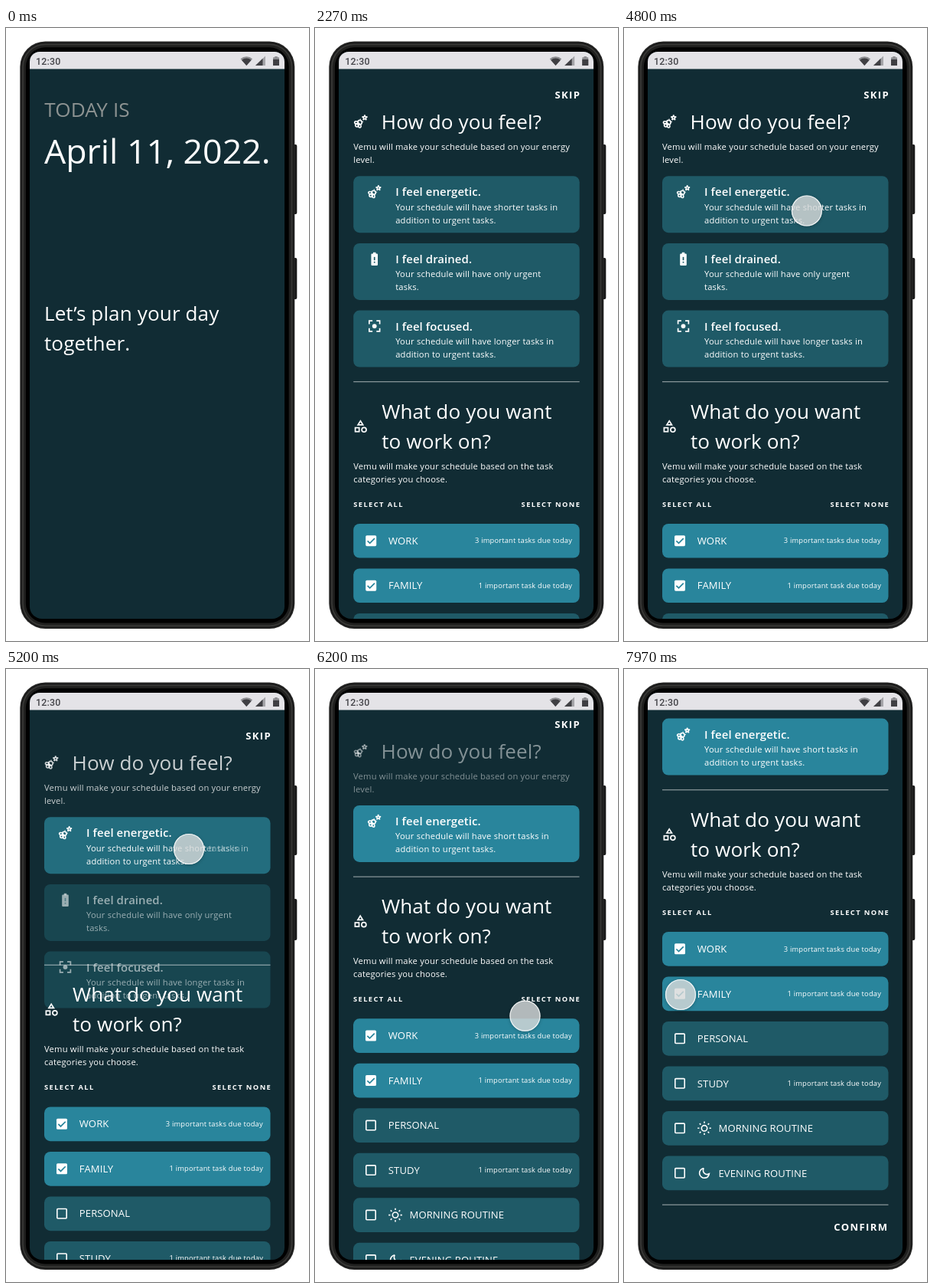
These frames come from a looping animation (396x800 px, 8 s). An HTML page with a canvas:

```html
<!DOCTYPE html>
<html lang="en">
<head>
<meta charset="utf-8">
<title>Day planner</title>
<style>
html, body { margin: 0; width: 100%; height: 100%; overflow: hidden; background: #fff; }
canvas { display: block; width: 396px; height: 800px; }
</style>
</head>
<body>
<canvas id="stage"></canvas>
<script>
const LOOP = 8000, W = 396, H = 800;
const SANS = '"Open Sans", "Noto Sans", sans-serif';
const BG = '#112c34', IDLE = [31, 90, 103], ACTIVE = [41, 133, 156];
const FOLD = 175.3, SCROLL = 128.6, PAGE = 333;

const canvas = document.getElementById('stage');
const ctx = canvas.getContext('2d');
const ratio = window.devicePixelRatio || 1;
canvas.width = W * ratio;
canvas.height = H * ratio;

// ---------- timing ----------
const clamp = v => Math.max(0, Math.min(1, v));
const mix = (a, b, p) => a + (b - a) * p;
const span = (t, start, length) => clamp((t - start) / length);
const inOut = x => x < 0.5 ? 2 * x * x : 1 - 2 * (1 - x) * (1 - x);

// cubic-bezier(0, 0, .58, 1)
function easeOut(x) {
  if (x <= 0 || x >= 1) return x;
  let lo = 0, hi = 1;
  for (let i = 0; i < 20; i++) {
    const s = (lo + hi) / 2;
    if (3 * (1 - s) * s * s * 0.58 + s * s * s < x) lo = s; else hi = s;
  }
  return lo * lo * (3 - 2 * lo);
}

// ---------- drawing helpers ----------
const tone = p => `rgb(${IDLE.map((v, i) => Math.round(mix(v, ACTIVE[i], p)))})`;

function rounded(x, y, w, h, r, fill) {
  ctx.beginPath();
  ctx.roundRect(x, y, w, h, r);
  if (fill) { ctx.fillStyle = fill; ctx.fill(); }
}

function text(str, x, y, size, { weight = 400, gap = 0, color = '#fff', family = SANS } = {}) {
  ctx.font = `${weight} ${size}px ${family}`;
  ctx.letterSpacing = gap + 'px';
  ctx.fillStyle = color;
  ctx.fillText(str, x, y);
  return ctx.measureText(str).width;
}

const title = (s, x, y, color) => text(s, x, y, 26.1, { color, gap: 0.09 });
const body = (s, x, y) => text(s, x, y, 11.2, { gap: 0.18 });
const button = (s, x, y) => text(s, x, y, 13.07, { weight: 700, gap: 1.4 });
const link = (s, x, y) => text(s, x, y, 9.33, { weight: 700, gap: 1.4 });

function faded(alpha, draw) {
  if (alpha <= 0) return;
  ctx.save();
  ctx.globalAlpha *= alpha;
  draw();
  ctx.restore();
}

function line(...pts) {
  ctx.beginPath();
  for (let i = 0; i < pts.length; i += 2) ctx.lineTo(pts[i], pts[i + 1]);
}

function ring(x, y, rx, ry = rx, turn = 0) {
  ctx.beginPath();
  ctx.ellipse(x, y, rx, ry, turn, 0, 7);
  ctx.stroke();
}

function dot(x, y, r) {
  ctx.beginPath();
  ctx.arc(x, y, r, 0, 7);
  ctx.fill();
}

function divider(y) {
  ctx.fillStyle = 'rgba(255,255,255,.62)';
  ctx.fillRect(50, y, 295.5, 1);
}

// ---------- icons, on a 24 unit grid ----------
function icon(draw, x, y, scale) {
  ctx.save();
  ctx.translate(x - 12 * scale, y - 12 * scale);
  ctx.scale(scale, scale);
  ctx.fillStyle = ctx.strokeStyle = '#fff';
  ctx.lineWidth = 2;
  draw();
  ctx.restore();
}

function bee() {
  ctx.lineWidth = 1.8;
  ring(5.8, 13.8, 3, 2, 0.35);
  ring(10.2, 18.2, 2, 3, -0.35);
  ring(10.7, 13.3, 3.1);
  ring(6.6, 17.4, 2.5);
  ctx.lineWidth = 1.1;
  line(11.5, 10, 11.5, 8); ctx.stroke();
  line(14, 12.5, 16, 12.5); ctx.stroke();
  ctx.lineWidth = 1.9;
  ring(18, 6.4, 1.9);
  for (let i = 0; i < 5; i++) {
    const a = -Math.PI / 2 + i * Math.PI * 0.4;
    dot(18 + 3.1 * Math.cos(a), 6.4 + 3.1 * Math.sin(a), 1.3);
  }
}

function battery() {
  rounded(7, 4, 10, 18, 1.4, '#fff');
  ctx.fillRect(10, 2, 4, 3);
  ctx.fillStyle = tone(0);
  ctx.fillRect(11, 9, 2, 5);
  ctx.fillRect(11, 16, 2, 2);
}

function focus() {
  dot(12, 12, 3.4);
  for (let i = 0; i < 4; i++) {
    ctx.save();
    ctx.translate(12, 12);
    ctx.rotate(i * Math.PI / 2);
    line(-8, -3, -8, -8, -3, -8);
    ctx.stroke();
    ctx.restore();
  }
}

function shapes() {
  line(12, 4, 15.8, 10, 8.2, 10);
  ctx.closePath();
  ctx.stroke();
  ctx.strokeRect(4, 14.4, 6, 6);
  ring(17.5, 17.5, 3.5);
}

function sun() {
  ring(12, 12, 4.6);
  for (let i = 0; i < 8; i++) {
    const c = Math.cos(i * Math.PI / 4), s = Math.sin(i * Math.PI / 4);
    line(12 + 8.2 * c, 12 + 8.2 * s, 12 + 11 * c, 12 + 11 * s);
    ctx.stroke();
  }
}

function moon() {
  ctx.beginPath();
  ctx.moveTo(11, 4);
  ctx.arc(12, 12, 8, -1.7, 0.15, true);
  ctx.bezierCurveTo(14.5, 16.5, 7.5, 11, 11, 4);
  ctx.closePath();
  ctx.stroke();
}

function checkbox(x, y, on) {
  if (!on) {
    ctx.strokeStyle = '#fff';
    ctx.lineWidth = 1.6;
    rounded(x - 6.2, y - 6.2, 12.4, 12.4, 1);
    ctx.stroke();
    return;
  }
  rounded(x - 7, y - 7, 14, 14, 1.6, '#fff');
  ctx.strokeStyle = tone(1);
  ctx.lineWidth = 1.7;
  line(x - 4.6, y + 0.2, x - 1.5, y + 3.2, x + 4.7, y - 3);
  ctx.stroke();
}

// ---------- screens ----------
function statusBar() {
  ctx.fillStyle = '#e4e3e7';
  ctx.fillRect(31, 30, PAGE, 23.5);
  text('12:30', 39, 48, 12.4, { weight: 500, gap: 0.2, color: '#45454a', family: 'Roboto, sans-serif' });
  const fan = (r, color) => {
    ctx.beginPath();
    ctx.moveTo(314.3, 49);
    ctx.arc(314.3, 49, r, -Math.PI * 0.73, -Math.PI * 0.27);
    ctx.closePath();
    ctx.fillStyle = color;
    ctx.fill();
  };
  fan(11.8, '#8d8d91');
  fan(9.4, '#3f3f43');
  ctx.fillStyle = '#a5a5a9';
  line(326, 49, 339, 49, 339, 36.5); ctx.fill();
  ctx.fillStyle = '#414145';
  line(326, 49, 335.5, 49, 335.5, 39.8); ctx.fill();
  ctx.fillStyle = '#8d8d91';
  ctx.fillRect(351.3, 37, 3.4, 2);
  rounded(349, 38.3, 8, 10.7, 0.8, '#8d8d91');
  ctx.fillStyle = '#3f3f43';
  ctx.fillRect(349, 41, 8, 8);
}

function welcome() {
  title('TODAY IS', 50.3, 116.3, '#8d9392');
  text('April 11, 2022.', 50, 176.7, 44.65);
  title('Let’s plan your day', 50, 382.3);
  title('together.', 50, 421.3);
}

function card(top, draw, heading, fill) {
  rounded(50, top, 295.5, 74, 8, fill);
  icon(draw, 77.5, top + 20.5, 0.86);
  text(heading, 105, top + 25.9, 14.93, { weight: 600, gap: 0.07 });
}

function header(fold) {
  button('SKIP', 313.2, 92.2);
  faded(mix(1, 0.48, fold), () => {
    icon(bee, 59.5, 122, 0.88);
    title('How do you feel?', 86.6, 132.2);
    body('Vemu will make your schedule based on your energy', 50, 159.2);
    body('level.', 50, 176);
  });
}

function moods(fold) {
  faded(1 - fold, () => {
    card(280.9, battery, 'I feel drained.', tone(0));
    body('Your schedule will have only urgent', 105, 325.4);
    body('tasks.', 105, 342.2);
    card(368.6, focus, 'I feel focused.', tone(0));
    body('Your schedule will have longer tasks in', 105, 413.1);
    body('addition to urgent tasks.', 105, 429.9);
  });
  card(193.2, bee, 'I feel energetic.', tone(fold));
  const x = 105 + body('Your schedule will have short', 105, 237.7);
  faded(1 - fold, () => body('er tasks in', x, 237.7));
  faded(fold, () => body(' tasks in', x, 237.7));
  body('addition to urgent tasks.', 105, 254.5);
}

const ROWS = [
  { name: 'WORK', on: true, note: '3 important tasks due today', at: 208.8 },
  { name: 'FAMILY', on: true, note: '1 important task due today', at: 213.6 },
  { name: 'PERSONAL' },
  { name: 'STUDY', note: '1 important task due today', at: 213.6 },
  { name: 'MORNING ROUTINE', mark: sun },
  { name: 'EVENING ROUTINE', mark: moon }
];

function categories() {
  divider(461.2);
  icon(shapes, 59.2, 519.6, 0.85);
  title('What do you want', 87, 509.7);
  title('to work on?', 87, 548.7);
  body('Vemu will make your schedule based on the task', 50, 575.8);
  body('categories you choose.', 50, 592.6);
  link('SELECT ALL', 50, 624.6);
  link('SELECT NONE', 269.4, 624.6);
  ROWS.forEach((row, i) => {
    const y = 669.2 + i * 58.5;
    rounded(50, y - 22.3, 295.5, 44.7, 8, tone(row.on ? 1 : 0));
    checkbox(73, y, row.on);
    if (row.mark) icon(row.mark, 105, y, 0.8);
    text(row.name, row.mark ? 123.5 : 95.8, y + 4.7, 13.07, { gap: 0.1 });
    if (row.note) text(row.note, row.at, y + 3.2, 9.33, { gap: 0.18 });
  });
  divider(1002.6);
  button('CONFIRM', 274.2, 1036.8);
}

function planner(fold, scroll) {
  ctx.save();
  ctx.translate(0, -scroll);
  header(fold);
  moods(fold);
  ctx.translate(0, -FOLD * fold);
  categories();
  ctx.restore();
}

// ---------- phone ----------
function phone() {
  rounded(374, 152, 6.3, 91, 2, '#1b1b1b');
  rounded(374, 300, 6.3, 54, 2, '#1b1b1b');
  const shell = (inset, fill) =>
    rounded(18.3 + inset, 17.6 + inset, 359 - 2 * inset, 766.4 - 2 * inset, 33 - inset, fill);
  shell(0, '#2a2a29');
  shell(1.2, '#191919');
  shell(2.8, '#383836');
  shell(4.6, '#20201f');
  shell(7.6, '#000');
}

// ---------- pointer ----------
function arrow(t) {
  if (t < 2670 || t > 4300) return;
  const a = easeOut(span(t, 2670, 800));
  const b = inOut(span(t, 3490, 190));
  const c = easeOut(span(t, 3680, 320));
  const x = mix(mix(mix(7, 187, a), 229.5, b), 230.5, c);
  const y = mix(mix(mix(555, 404, a), 312, b), 301, c);
  faded(1 - span(t, 4140, 120), () => {
    ctx.save();
    ctx.translate(x, y);
    line(0, 0, 0, 14.6, 3.4, 11.5, 5.8, 16.8, 8.2, 15.8, 5.9, 10.6, 10.6, 10.4);
    ctx.closePath();
    ctx.lineJoin = 'round';
    ctx.strokeStyle = '#fff';
    ctx.lineWidth = 2;
    ctx.stroke();
    ctx.fillStyle = '#000';
    ctx.fill();
    ctx.restore();
  });
}

function touch(t, scroll) {
  const rise = easeOut(span(t, 4140, 800));
  const move = inOut(span(t, 5790, 290));
  const last = easeOut(span(t, 6840, 800));
  const x = mix(mix(mix(236, 239, rise), 274.5, move), 74, last);
  const y = mix(mix(mix(308, 235, rise), 468, move) - scroll, 425, last);
  faded(span(t, 4140, 250), () => {
    ctx.save();
    ctx.shadowColor = 'rgba(0,0,0,.35)';
    ctx.shadowBlur = 4 * ratio;
    ctx.shadowOffsetY = ratio;
    ctx.fillStyle = 'rgba(234,236,237,.75)';
    dot(x, y, 20);
    ctx.restore();
    ctx.strokeStyle = 'rgba(255,255,255,.8)';
    ctx.lineWidth = 1.2;
    ring(x, y, 19.5);
  });
}

function render(t) {
  const slide = PAGE * easeOut(span(t, 1594, 690));
  const fold = easeOut(span(t, 4970, 800));
  const scroll = SCROLL * inOut(span(t, 6082, 488));

  ctx.setTransform(ratio, 0, 0, ratio, 0, 0);
  ctx.fillStyle = '#fff';
  ctx.fillRect(0, 0, W, H);
  phone();

  ctx.save();
  rounded(31, 31, PAGE, 740, [13, 13, 16, 16], BG);
  ctx.clip();
  ctx.translate(-slide, 0);
  if (slide < PAGE) { welcome(); statusBar(); }
  ctx.translate(PAGE, 0);
  if (slide > 0) { planner(fold, scroll); statusBar(); }
  ctx.restore();

  arrow(t);
  touch(t, scroll);
}

const begin = performance.now();
function tick() {
  render((performance.now() - begin) % LOOP);
  requestAnimationFrame(tick);
}
tick();
</script>
</body>
</html>
```
